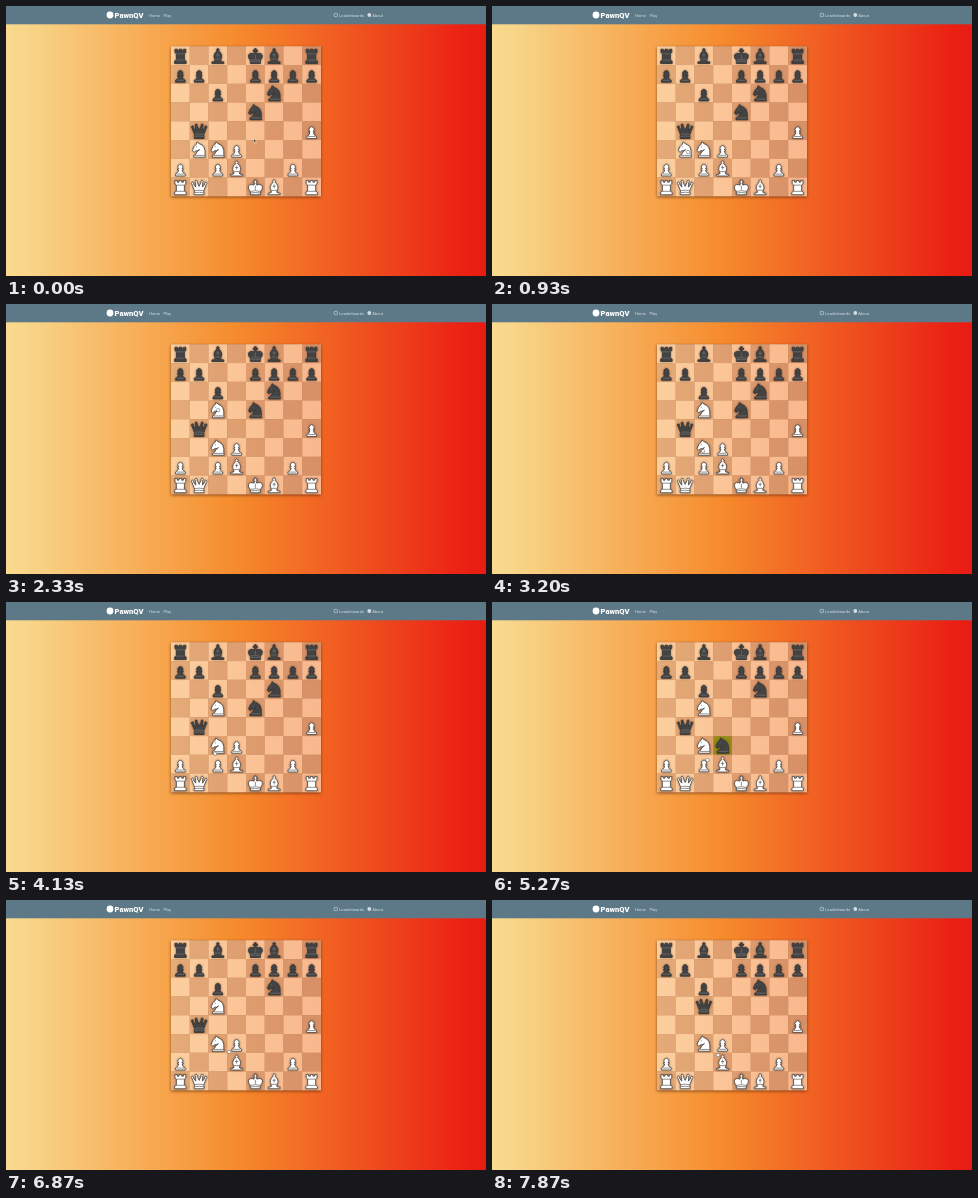
Recreate the animation shown at these times as an HTML page. Size 480 by 270 pixels, loop 8 s.

```html
<!DOCTYPE html>
<html lang="en">
<head>
<meta charset="utf-8">
<title>Chess board</title>
<style>
html, body { margin: 0; width: 100%; height: 100%; overflow: hidden; }
svg { display: block; width: 100%; height: 100%; }
text { font: 4.1px Roboto, sans-serif; fill: #d3dde2; }
.brand { font: 900 7.6px Roboto, sans-serif; fill: #fff; }
.w { fill: #fff; stroke: #4a4542; }
.b { fill: #434343; stroke: #363433; }
.w, .b { stroke-width: .8; stroke-linejoin: round; filter: drop-shadow(0 .8px .9px rgba(0, 0, 0, .4)); }
.line { fill: none; stroke-width: .6; }
.b .line { stroke: #777; }
.hint { fill: #827d00; fill-opacity: .82; }
</style>
</head>
<body>
<svg viewBox="0 0 480 270" preserveAspectRatio="none">
  <defs>
    <linearGradient id="sky">
      <stop offset="0" stop-color="#f9da8f"/>
      <stop offset=".04" stop-color="#f8d68a"/>
      <stop offset=".48" stop-color="#f68b2c"/>
      <stop offset=".96" stop-color="#ea2014"/>
      <stop offset="1" stop-color="#e91b12"/>
    </linearGradient>
    <linearGradient id="light" gradientUnits="userSpaceOnUse" x1="165" x2="315">
      <stop stop-color="#fccf9f"/><stop offset="1" stop-color="#f9b78d"/>
    </linearGradient>
    <linearGradient id="dark" gradientUnits="userSpaceOnUse" x1="165" x2="315">
      <stop stop-color="#e5ab78"/><stop offset="1" stop-color="#d78f66"/>
    </linearGradient>
  </defs>
  <rect width="480" height="270" fill="url(#sky)"/>
  <rect width="480" height="18.3" fill="#5d7988"/>
  <circle cx="104" cy="9" r="3.4" fill="#fff"/>
  <text class="brand" x="108.5" y="11.6">PawnQV</text>
  <text x="143" y="10.5">Home</text>
  <text x="157.5" y="10.5">Play</text>
  <rect x="328.2" y="7.4" width="3.2" height="3.2" rx=".5" fill="none" stroke="#d3dde2" stroke-width=".6"/>
  <text x="333" y="10.5">Leaderboards</text>
  <circle cx="363.3" cy="9" r="1.9" fill="#d3dde2"/>
  <text x="366.3" y="10.5">About</text>
  <rect x="165" y="40.3" width="150" height="150" fill="#b5754a" style="filter:drop-shadow(0 1px 1.5px rgba(60,20,0,.6))"/>
  <g id="board"></g>
  <g id="hints"></g>
  <g id="men"></g>
  <g id="arrow"><path d="M0 0V4.2L1 3.3L1.8 5L2.5 4.7L1.8 3.1H3.1Z" fill="#222" stroke="#fff" stroke-width=".5"/></g>
  <g id="hand"><path d="M-1.7-.4Q-1.5-1.5 0-1.5Q1.8-1.5 1.8-.2L1.3 1.7H-1Z" fill="#fff" stroke="#444" stroke-width=".45"/></g>
</svg>
<script>
const NS = 'http://www.w3.org/2000/svg', SIZE = 18.75, LEFT = 165, TOP = 40.3, LOOP = 8000;
const $ = id => document.getElementById(id);
const centre = (c, r) => [LEFT + SIZE * (c + .5), TOP + SIZE * (r + .5)];

// Outlines are centred on a square; the second path holds inner lines.
const shapes = {
  p: ['M-4.8 7.8V5.9Q-1.9 4.4-1.7 1.8H-2.8V.6H-1.6A2.5 2.5 0 1 1 1.6 .6H2.8V1.8H1.7Q1.9 4.4 4.8 5.9V7.8Z', 'M-3.6 5.9H3.6'],
  r: ['M-5.8 7.8V5.6L-4 4.2V-1.8L-5.4-3.1V-6.4H-3.1V-4.8H-1.3V-6.4H1.3V-4.8H3.1V-6.4H5.4V-3.1L4-1.8V4.2L5.8 5.6V7.8Z', 'M-4-1.8H4M-4 4.4H4'],
  n: ['M-5.4 7.8V6.1L-3.2 4.7Q-2.8 2.2 .6 .2Q-1.2 1.4-3.4 1.4L-5 2.8L-6.8 1.2Q-5.4-3.6-2.8-5.2L-2-7.5L.2-5.8Q6.8-3.9 5.9 5.4L6.3 7.8Z', 'M-4.2 6H5.7M-3-2.4L-2-2.8'],
  b: ['M-6 7.8V6.3Q-2.5 6.3-2.4 4.7H-3.2V3.3Q-5.4-.8-.8-4.8A1.3 1.3 0 1 1 .8-4.8Q5.4-.8 3.2 3.3V4.7H2.4Q2.5 6.3 6 6.3V7.8Z', 'M0-2.6V1.4M-1.6-.7H1.6M-3 3.4H3'],
  q: ['M-4.9 7.8V5.8L-4.5 4.2L-7.2-2.7A1.1 1.1 0 1 1-5.8-3L-3.3 .2L-3.6-4.7A1.1 1.1 0 1 1-2.1-4.9L0-.5L2.1-4.9A1.1 1.1 0 1 1 3.6-4.7L3.3 .2L5.8-3A1.1 1.1 0 1 1 7.2-2.7L4.5 4.2L4.9 5.8V7.8Z', 'M-4.4 3.8Q0 2.6 4.4 3.8M-4.7 5.8Q0 4.8 4.7 5.8'],
  k: ['M-5 7.8V4.6Q-7.6 2-6.9-.5Q-5.4-3.4-1.5-1.8L-.8-3.4V-4.2H-2.2V-5.6H-.8V-7H.8V-5.6H2.2V-4.2H.8V-3.4L1.5-1.8Q5.4-3.4 6.9-.5Q7.6 2 5 4.6V7.8Z', 'M-4.9 4.5Q0 3 4.9 4.5M-4.9 6.1Q0 5 4.9 6.1M0-1.2V3']
};

function add(parent, tag, attrs) {
  const el = document.createElementNS(NS, tag);
  for (const k in attrs) el.setAttribute(k, attrs[k]);
  return parent.appendChild(el);
}
const square = (parent, c, r, attrs) => add(parent, 'rect',
  { x: LEFT + c * SIZE, y: TOP + r * SIZE, width: SIZE, height: SIZE, ...attrs });
const place = (el, [x, y]) => el.setAttribute('transform', `translate(${x} ${y})`);
const show = (el, on) => el.style.display = on ? '' : 'none';

for (let i = 0; i < 64; i++) {
  const c = i % 8, r = i >> 3;
  square($('board'), c, r, { fill: `url(#${(c + r) % 2 ? 'dark' : 'light'})` });
}

const men = {};
'r1b1kb1r/pp2pppp/2p2n2/4n3/1q5P/1NNP4/P1PB2P1/RQ2KB1R'.split('/').forEach((row, r) => {
  let c = 0;
  for (const ch of row) {
    if (+ch) { c += +ch; continue; }
    const kind = ch.toLowerCase(), g = add($('men'), 'g', { class: ch === kind ? 'b' : 'w' });
    add(g, 'path', { d: shapes[kind][0] });
    add(g, 'path', { d: shapes[kind][1], class: 'line' });
    place(g, centre(c, r));
    men['abcdefgh'[c] + (8 - r)] = g;
    c++;
  }
});

// Legal targets, shown while a piece is held.
const hints = [[0, 3, 0], [2, 3, 0], [3, 4, 0], [2, 7, 0], [3, 5, 1]].map(([c, r, turn]) =>
  ({ el: square($('hints'), c, r, { class: 'hint' }), from: [1330, 5200][turn], to: [2130, 5870][turn] }));

// Keys are [time, x, y].
const key = (t, c, r) => [t, ...centre(c, r)];
const moves = {
  b3: [key(1330, 1, 5), [1600, 198, 136.6], key(2000, 2, 3)],
  e5: [key(4470, 4, 3), key(4471, 3, 5)],
  c2: [key(5250, 2, 6), key(5720, 3, 5)],
  b4: [key(7470, 1, 4), key(7471, 2, 3)]
};
const captures = { d3: 4470, e5: 5870, b3: 7470 };
const pointer = [
  [250, 247.5, 132.5], [900, 196, 146], [1330, 196, 143], [1600, 203, 124.5],
  [2000, 212, 106], [2400, 212, 106], [2800, 209, 126], [2930, 209, 136],
  [3200, 211, 147], [3700, 212, 165], [4130, 209, 151.5], [4700, 212, 160],
  [5150, 213, 161], [5270, 215.5, 158], [5720, 232, 144], [6000, 231, 144],
  [6500, 222, 150], [6870, 223, 152], [7200, 226, 155]
];

function track(keys, t) {
  const i = keys.findIndex(k => k[0] > t);
  if (i < 0) return keys[keys.length - 1].slice(1);
  if (!i) return keys[0].slice(1);
  const [a, b] = [keys[i - 1], keys[i]];
  let u = (t - a[0]) / (b[0] - a[0]);
  u *= u * (3 - 2 * u);
  return [a[1] + (b[1] - a[1]) * u, a[2] + (b[2] - a[2]) * u];
}

// Pieces that move are drawn above the rest.
['e5', 'b3', 'c2', 'b4'].forEach(id => $('men').append(men[id]));

const start = performance.now();
function draw(now) {
  const t = Math.max(0, now - start) % LOOP;
  for (const id in moves) place(men[id], track(moves[id], t));
  for (const id in captures) show(men[id], t < captures[id]);
  for (const h of hints) show(h.el, t >= h.from && t < h.to);
  const at = track(pointer, t), free = t < 800;
  for (const id of ['arrow', 'hand']) {
    place($(id), at);
    show($(id), free === (id === 'arrow'));
  }
  requestAnimationFrame(draw);
}
draw(start);
</script>
</body>
</html>
```
